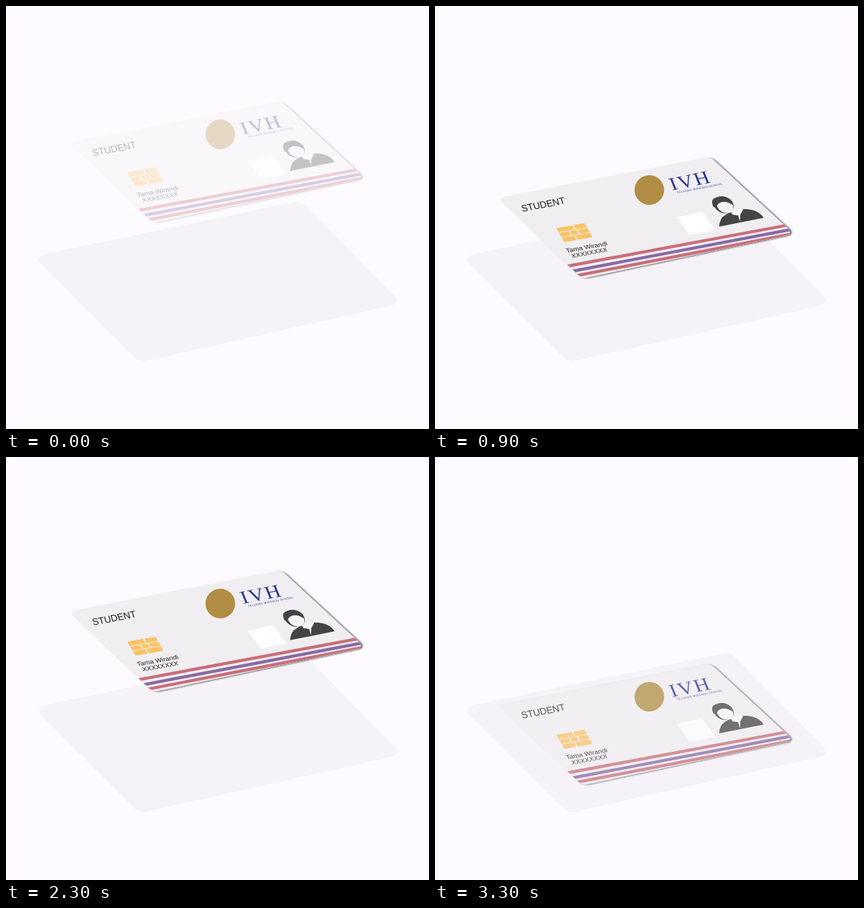
These frames come from a looping animation (600 by 600 pixels, 3.4 s). An HTML page:

```html
<!DOCTYPE html>
<html lang="en">
<head>
<meta charset="utf-8">
<title>Student card</title>
<style>
  html, body { margin: 0; width: 100%; height: 100%; overflow: hidden; background: #fdfbff; }
  svg { display: block; width: 100vw; height: 100vh; }
  text { font-family: "Liberation Sans", Arial, sans-serif; fill: #1c1c1e; }
  .brand text { font-family: "Liberation Serif", Times, serif; fill: #28348f; }
  .brand .sub { font-family: "Liberation Sans", Arial, sans-serif; }
</style>
</head>
<body>
<svg viewBox="0 0 600 600">
  <defs>
    <path id="face" d="M97 193 L383 137 Q391 135.500 397 141 L501 237 Q507 243.500 498 246.500 L216 306 Q208 307.500 202 301.500 L94 198 Q91 194.500 97 193Z"/>
    <clipPath id="inside"><use href="#face"/></clipPath>
    <filter id="shadow" x="-10%" y="-10%" width="120%" height="120%">
      <feDropShadow dx="2.600" dy=".6" stdDeviation=".9" flood-color="#000" flood-opacity=".65"/>
    </filter>
  </defs>

  <rect width="600" height="600" fill="#fdfbff"/>
  <path fill="#f5f3f7" d="M54 352 L408 278.500 Q418 276 424 282 L552 412 Q557 421 547 425 L200 503 Q190 506 183 499 L49 366 Q42 356 54 352Z"/>

  <g id="card">
    <use href="#face" fill="#f0eef1" filter="url(#shadow)"/>

    <g clip-path="url(#inside)" fill="none" stroke-width="4.400">
      <path stroke="#c86f7a" d="M180 291.500 L510 230"/>
      <path stroke="#876ba4" d="M180 300 L510 237"/>
      <path stroke="#c86f7a" d="M180 307.500 L510 243.500"/>
    </g>

    <text transform="matrix(.98 -.19 .3 .98 124 213)" font-size="13.300">STUDENT</text>
    <text transform="matrix(.98 -.18 .3 .85 187 271)" font-size="9.700">Tama Wirandi</text>
    <text transform="matrix(.98 -.18 .3 .85 194.500 278.500)" font-size="9.700">XXXXXXXX</text>

    <g transform="matrix(.4 -.07 .115 .2 172 236)">
      <rect width="100" height="100" rx="5" fill="#f8c267"/>
      <path fill="none" stroke="#f6ead8" stroke-width="5" d="M0 33H100 M0 66H100 M58 0V33 M36 33V66 M64 33V66 M46 66V100"/>
    </g>

    <circle cx="304" cy="182" r="21" fill="#b08d42"/>
    <g class="brand">
      <text transform="matrix(1 -.2 .35 .85 336.500 182.500)" font-size="29" letter-spacing="2">IVH</text>
      <text class="sub" transform="matrix(.98 -.19 .35 .95 343.500 187)" font-size="4" letter-spacing=".45">TELUKAN WIRANDU SCHOOL</text>
    </g>

    <path fill="#fff" d="M343 220.500 L379 213 L398 239 L361 246Z"/>

    <g fill="#444446">
      <path d="M403 234 Q404 222 411 218 L419 213 L429 218 L437 209 Q450 209 457 213 Q463 216 466 221.500Z"/>
      <path fill="#f8f6f9" d="M419 212 L431 208.500 L437 210 L433 217 L432.500 227 L430 218 L422 217Z"/>
      <ellipse cx="409.500" cy="203" rx="15" ry="11.500" transform="rotate(25 409.500 203)"/>
      <ellipse cx="411.500" cy="204.500" rx="12.500" ry="9.500" fill="#f5f3f6" transform="rotate(30 411.500 204.500)"/>
      <path d="M395 206 Q389 194 401 192 Q414 189.500 421 198 L422 203 Q414 197.500 407 199 Q401 200 399 207Z"/>
    </g>
  </g>
</svg>
<script>
  const LOOP = 3400, STEP = 100, CYCLE = 1669;
  const SLIDE_START = 500, SLIDE_TIME = 800, DROP = 158;
  const FADE_IN = 200, FADE_OUT_START = 1400;
  const card = document.getElementById("card");
  const clamp = x => Math.min(1, Math.max(0, x));

  function draw(time) {
    const now = Math.floor((time % LOOP) / STEP) * STEP;
    const t = now % CYCLE;
    const y = DROP * clamp((t - SLIDE_START) / SLIDE_TIME);
    const appear = 0.3 + 0.7 * clamp(t / FADE_IN);
    const vanish = 1 - 0.26 * clamp((t - FADE_OUT_START) / 231);
    card.setAttribute("transform", `translate(0 ${y.toFixed(2)})`);
    card.setAttribute("opacity", (appear * vanish).toFixed(3));
  }

  const start = performance.now();
  function tick() {
    draw(performance.now() - start);
    requestAnimationFrame(tick);
  }
  tick();
</script>
</body>
</html>
```
